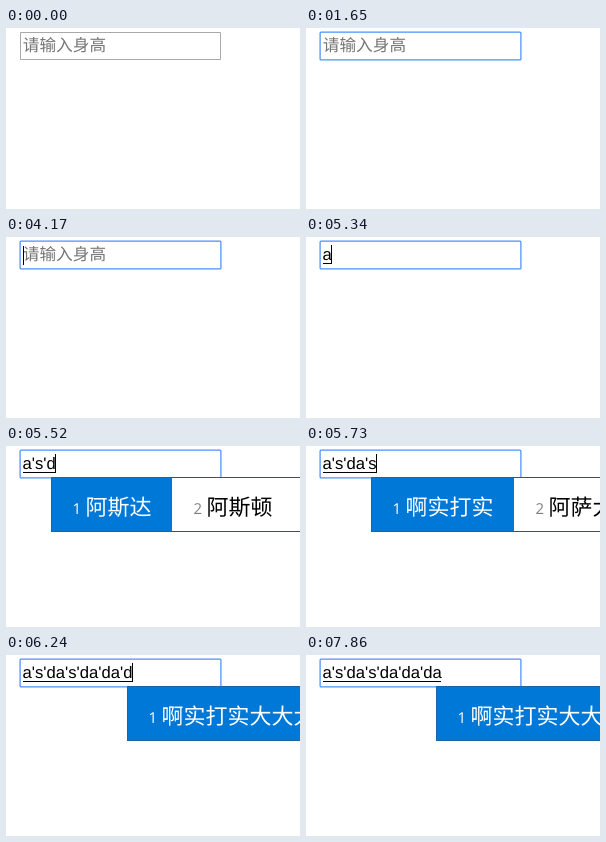
Write an HTML page with a canvas that moves like this. It is 294 by 181 pixels and loops after 8 s.

```html
<!DOCTYPE html>
<html lang="zh-CN">
<head>
<meta charset="utf-8">
<title>Pinyin input</title>
<style>
  html, body { margin: 0; width: 100%; height: 100%; overflow: hidden; background: #fff; }
  canvas { display: block; width: 294px; height: 181px; }
</style>
</head>
<body>
<canvas id="stage" width="294" height="181"></canvas>
<script>
const ctx = document.getElementById('stage').getContext('2d');
const LOOP = 8000, FOCUS = 1170, TYPING = 5340;
const TEXT_X = 16.6;
const CJK = '"Noto Sans CJK SC", "Noto Sans CJK", sans-serif';
const LATIN = '"Liberation Sans", Arial, sans-serif';
const DIGITS = '"Open Sans", sans-serif';

// Composition states: start time, pinyin, candidate window x, candidates
const steps = [
  [5340, "a", 0, []],
  [5370, "a", 20, ['啊', '阿', '吖', '嗄', '锕']],
  [5430, "a's", 32, ['暗示', '阿三', '按时']],
  [5520, "a's'd", 45, ['阿斯达', '阿斯顿']],
  [5640, "a's'da", 54, ['阿斯达', '阿萨大']],
  [5730, "a's'da's", 65, ['啊实打实', '阿萨大厦']],
  [5760, "a's'da's'd", 78, ['啊实打实的', '阿萨大']],
  [5880, "a's'da's'da", 87, ['啊实打实大', '阿萨大']],
  [6060, "a's'da's'da'd", 99, ['啊实打实大大']],
  [6150, "a's'da's'da'da", 108, ['啊实打实大大']],
  [6240, "a's'da's'da'da'd", 121, ['啊实打实大大大']],
  [6330, "a's'da's'da'da'da", 130, ['啊实打实大大大']]
];
const blinks = [1650, 2160, 2640, 3150, 3660, 4170, 4710, 5190, 6840, 7350, 7860];

function rect(x, y, w, h, color) {
  ctx.fillStyle = color;
  ctx.fillRect(x, y, w, h);
}

function text(str, x, y, size, family, color, weight = 400) {
  ctx.font = `${weight} ${size}px ${family}`;
  ctx.fillStyle = color;
  ctx.fillText(str, x, y);
  return ctx.measureText(str).width;
}

function drawField(focused) {
  ctx.beginPath();
  if (focused) {
    ctx.strokeStyle = '#4d90fe';
    ctx.lineWidth = 1.25;
    ctx.roundRect(14.1, 4.1, 200.8, 27.8, 1);
  } else {
    ctx.strokeStyle = '#a9a9a9';
    ctx.lineWidth = 1;
    ctx.rect(14.5, 4.5, 200, 27);
  }
  ctx.stroke();
}

function drawCandidates(left, words) {
  const top = 31, height = 55, em = 22;
  const edge = (x, w, color) => {
    rect(x, top, w, 1, color);
    rect(x, top + height - 1, w, 1, color);
  };
  rect(left, top, 294 - left, height, '#fff');
  edge(left, 294 - left, '#4a4f55');
  let x = left;
  words.forEach((word, i) => {
    const w = 55 + em * word.length, active = i === 0;
    if (active) {
      rect(x, top, w, height, '#0078d7');
      edge(x, w, '#1766a8');
      rect(x, top, 1, height, '#1766a8');
    }
    text(i + 1, x + 21.6, 68, 15, DIGITS, active ? '#fff' : '#808080');
    text(word, x + 34.5, 69, em, CJK, active ? '#fff' : '#000', 500);
    x += w;
  });
}

function caretOn(t) {
  const since = t < TYPING ? FOCUS : TYPING;
  const flips = blinks.filter(b => b > since && b <= t).length;
  return t >= FOCUS && flips % 2 === 0;
}

function draw(t) {
  rect(0, 0, 294, 181, '#fff');
  ctx.textRendering = 'geometricPrecision';
  drawField(t >= FOCUS);
  if (t < TYPING) {
    text('请输入身高', 16.8, 23.2, 16.667, CJK, '#757575');
    if (caretOn(t)) rect(17, 9, 1, 19, '#000');
    return;
  }
  const [, pinyin, left, words] = steps.filter(s => s[0] <= t).pop();
  const width = text(pinyin, TEXT_X, 23, 16.667, LATIN, '#000');
  const end = Math.floor(TEXT_X + width);
  rect(17, 26, end - 17, 1, '#000');
  if (caretOn(t)) rect(end, 8, 1, 19, '#000');
  if (words.length) drawCandidates(left, words);
}

function tick() {
  draw(performance.now() % LOOP);
  requestAnimationFrame(tick);
}
tick();
</script>
</body>
</html>
```
